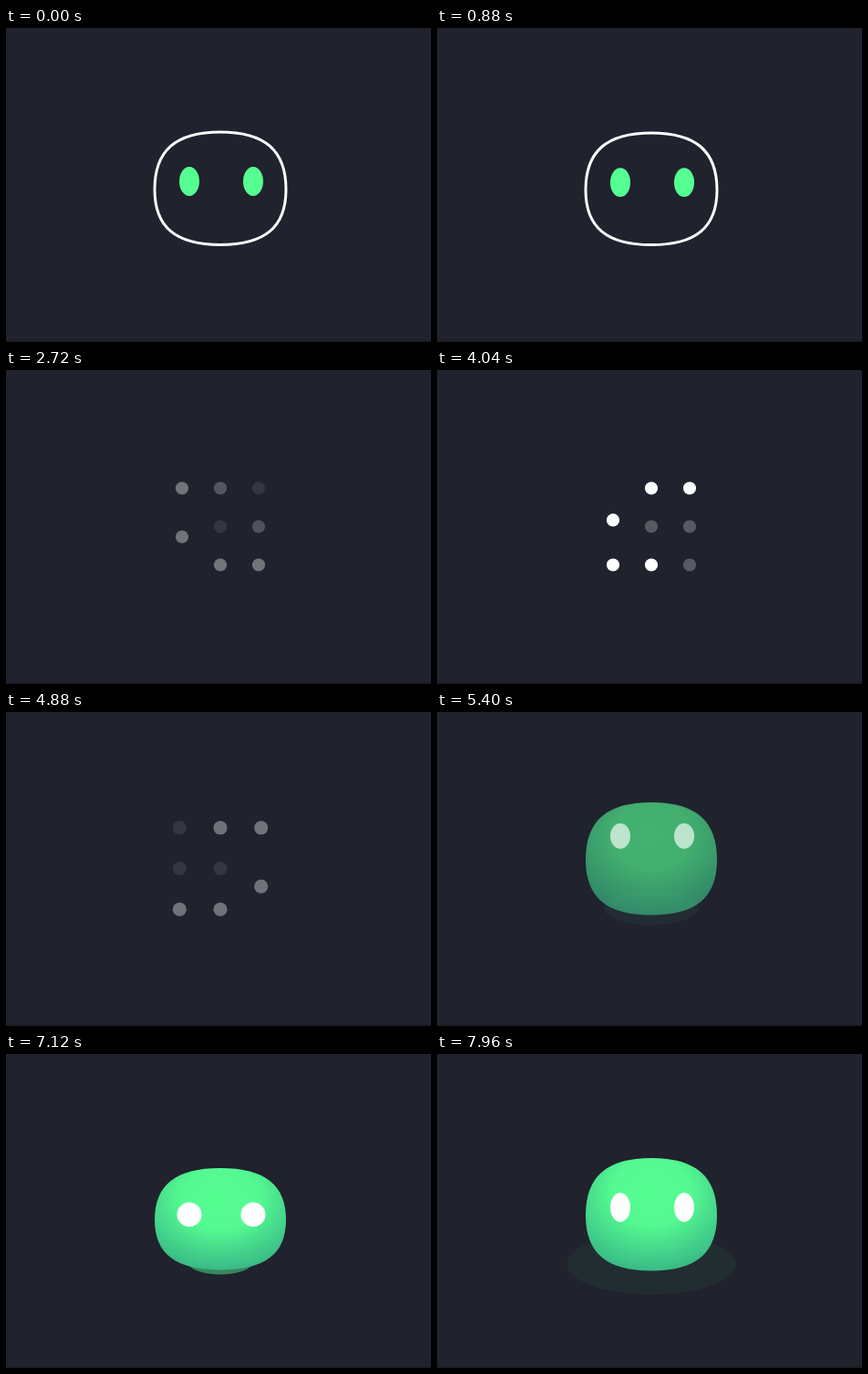
Write an HTML page that moves like this. It is 466 px wide and 344 px high and loops after 8000 ms.

```html
<!DOCTYPE html>
<html lang="en">
<head>
<meta charset="utf-8">
<title>Slime</title>
<style>
  html, body { margin: 0; width: 100%; height: 100%; overflow: hidden; background: #20222d; }
  svg { display: block; width: 100%; height: 100%; }
</style>
</head>
<body>
<svg viewBox="0 0 466 344">
  <defs>
    <radialGradient id="skin" cx=".5" cy=".3" r=".78">
      <stop offset="0" stop-color="#55fd92"/>
      <stop offset=".38" stop-color="#54fa91"/>
      <stop offset="1" stop-color="#35ae84"/>
    </radialGradient>
  </defs>
  <rect width="466" height="344" fill="#20222d"/>
  <rect y="342.5" width="466" height="1.5" fill="#1b1b23"/>
  <g id="dots" fill="#fff"></g>
  <g id="face">
    <ellipse id="ripple" cx="235" fill="#55fd92"/>
    <path id="body" stroke-width="3"/>
    <ellipse id="left" cx="201"/>
    <ellipse id="right" cx="271"/>
  </g>
</svg>
<script>
const LOOP = 8000, DOTS_AT = 2540, SLIME_AT = 5080, HOP = 2000, STEP = 200, FADE = 490;
const CX = 235, CY = 171.5, GAP = 42, DIM = .25;
const TOP = 114, BOTTOM = 237.5, EYE = 168;

const $ = id => document.getElementById(id);
const clamp = x => Math.min(1, Math.max(0, x));
const smooth = x => x * x * (3 - 2 * x);
const mix = (a, b, k) => a + (b - a) * k;
const set = (el, attrs) => { for (const k in attrs) el.setAttribute(k, attrs[k]); };

// Cosine bump that peaks at 1
function bump(t, peak, rise, fall = rise) {
  const x = t < peak ? (peak - t) / rise : (t - peak) / fall;
  return x < 1 ? (1 + Math.cos(Math.PI * x)) / 2 : 0;
}

function sketchPose(t) {
  const squash = bump(t, 500, 500), leap = width => bump(t, 2020, width);
  return {
    top: TOP + 7 * squash - 78 * leap(530),
    bottom: BOTTOM - 67 * leap(340),
    eye: EYE + 9 * squash - 80 * leap(600),
    rx: 11 + .5 * squash,
    ry: 16 - squash
  };
}

// A high hop, a squash, then a short bounce with the eyes trailing
function slimePose(t) {
  const hop = bump(t, 220, 220, 480), squash = bump(t, 1110, 180);
  const bounce = bump(t, 1290, 150, 240), trail = bump(t, 1290, 150, 330);
  return {
    top: TOP + 11 * squash - 37.5 * hop - 27 * bounce,
    bottom: BOTTOM - squash - 28.5 * hop - 27 * bounce,
    eye: EYE + 8 * squash - 36 * hop - 43 * trail,
    rx: 11 + 2.5 * squash + .5 * hop,
    ry: 16 - 2.7 * squash - .4 * hop - 3.5 * bounce
  };
}

function blob(top, bottom) {
  const rx = 72, mid = mix(top, bottom, .51), h = rx * .68;
  const up = (mid - top) * .68, down = (bottom - mid) * .68;
  const l = CX - rx, r = CX + rx;
  return `M${CX} ${top}C${CX + h} ${top} ${r} ${mid - up} ${r} ${mid}` +
    `C${r} ${mid + down} ${CX + h} ${bottom} ${CX} ${bottom}` +
    `S${l} ${mid + down} ${l} ${mid}` +
    `C${l} ${mid - up} ${CX - h} ${top} ${CX} ${top}Z`;
}

function drawFace({ top, bottom, eye, rx, ry }, opacity, filled) {
  set($("body"), {
    d: blob(top, bottom), opacity,
    fill: filled ? "url(#skin)" : "none", stroke: filled ? "none" : "#fff"
  });
  for (const id of ["left", "right"])
    set($(id), { cy: eye, rx, ry, opacity, fill: filled ? "#fff" : "#55ff91" });
}

function drawRipple(t, bottom, alpha) {
  const k = clamp((t - 1060) / 940), rx = mix(34, 93, smooth(k));
  set($("ripple"), {
    cy: bottom - 7.5, rx, ry: rx * .36,
    opacity: k ? alpha * (.05 + .8 * Math.exp(-10 * k)) : 0
  });
}

// Cells around the centre, clockwise from the top left
function cell(i) {
  const a = (i - 3) * Math.PI / 4;
  return [Math.round(1.2 * Math.cos(a)), Math.round(1.2 * Math.sin(a))];
}

const dots = Array.from({ length: 8 }, () => {
  const c = document.createElementNS("http://www.w3.org/2000/svg", "circle");
  set(c, { cx: CX, cy: CY, r: 7.1, opacity: DIM });
  return $("dots").appendChild(c);
});

// The hole walks anticlockwise; dots within two cells of it are lit
function drawDots(t) {
  const steps = (t - 3989) / STEP, n = Math.floor(steps), k = smooth(steps - n);
  const late = clamp(2 * k - 1);
  for (let i = 1; i < 8; i++) {
    const from = cell(i - n), to = cell(i < 7 ? i - n : -n);
    const lit = i === 2 ? 1 - late : i === 3 ? 0 : i === 4 ? late : 1;
    set(dots[i], {
      cx: CX + GAP * mix(from[0], to[0], k),
      cy: CY + GAP * mix(from[1], to[1], k),
      opacity: mix(DIM, 1, lit)
    });
  }
  const out = smooth(clamp((t - SLIME_AT + FADE) / FADE));
  set($("dots"), {
    opacity: clamp((t - DOTS_AT) / FADE) * (1 - out),
    transform: `translate(${CX} ${CY}) scale(${1 + .1 * out}) translate(${-CX} ${-CY})`
  });
}

function draw(t) {
  const isDots = t >= DOTS_AT && t < SLIME_AT;
  $("dots").style.display = isDots ? "" : "none";
  $("face").style.display = isDots ? "none" : "";
  if (isDots) {
    drawDots(t);
  } else if (t < DOTS_AT) {
    drawFace(sketchPose(t), clamp((DOTS_AT - t) / FADE), false);
    drawRipple(0, BOTTOM, 0);
  } else {
    const p = t % HOP, pose = slimePose(p), alpha = clamp((t - SLIME_AT) / FADE);
    drawFace(pose, alpha, true);
    drawRipple(p, pose.bottom, alpha);
  }
}

function tick() {
  draw(performance.now() % LOOP);
  requestAnimationFrame(tick);
}
tick();
</script>
</body>
</html>
```
